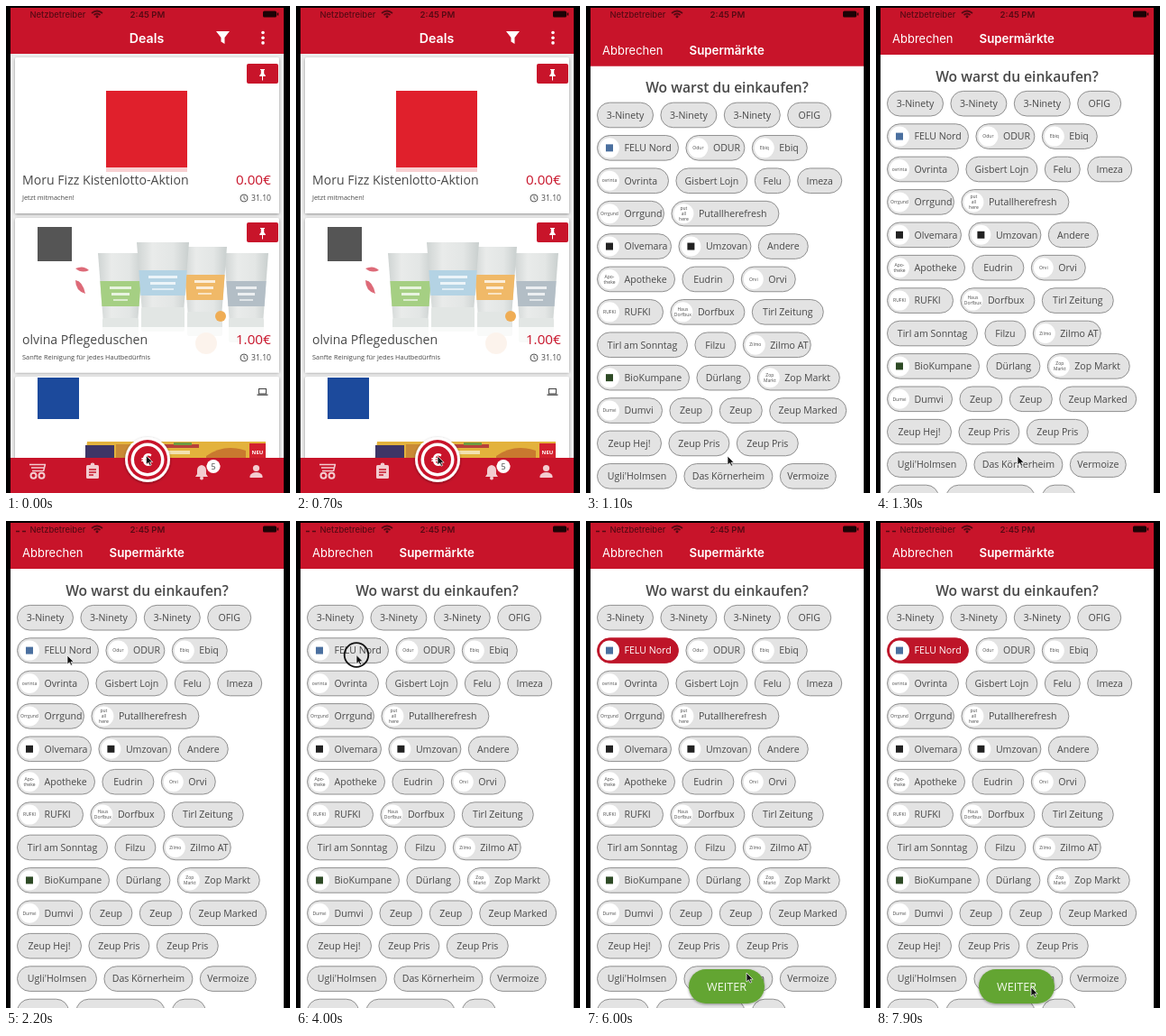
An HTML page that plays this animation: 315x540 px, repeating every 8000 ms.

```html
<!DOCTYPE html>
<html lang="de">
<head>
<meta charset="utf-8">
<title>Deals</title>
<style>
html, body { margin: 0; width: 100%; height: 100%; overflow: hidden; background: #000; }
svg { display: block; width: 100vw; height: 100vh; }
text { font-family: "Open Sans", "Noto Sans", sans-serif; fill: #484848; }
.ui { font-family: Inter, Roboto, sans-serif; fill: #fff; }
.price { font-weight: 500; fill: #c8142a; }
.pill { fill: #e3e3e3; stroke: #858585; stroke-width: .9; }
.on .pill { fill: #be1529; stroke: #be1529; }
.on > .name { fill: #fff; }
</style>
</head>
<body>
<svg viewBox="0 0 315 540">
  <defs>
    <clipPath id="screen"><rect x="5" y="2" width="303" height="538"/></clipPath>
    <filter id="shadow" x="-20%" y="-20%" width="140%" height="150%">
      <feDropShadow dx="0" dy="1" stdDeviation="1.4" flood-opacity=".4"/>
    </filter>
    <filter id="smudge"><feGaussianBlur stdDeviation=".5"/></filter>
    <linearGradient id="plastic">
      <stop stop-color="#cfd4d3"/><stop offset=".3" stop-color="#e9ebea"/>
      <stop offset=".7" stop-color="#e3e6e5"/><stop offset="1" stop-color="#c9cfce"/>
    </linearGradient>
  </defs>
  <rect width="315" height="540"/>
  <g clip-path="url(#screen)">
    <g id="deals"></g>
    <g id="sheet"></g>
    <g id="status" filter="url(#smudge)"></g>
    <g id="next"></g>
  </g>
  <circle id="ring" r="13.3" fill="none" stroke="#111" stroke-width="1.8"/>
  <path id="cursor" d="M0 0V10L2.4 7.8L4 11.2L5.7 10.4L4.1 7.2H7.2Z" fill="#111" stroke="#fff" stroke-width=".7"/>
</svg>
<script>
const LOOP = 8000, STEP = 100;
const RED = '#c8142a', PALE = '#f3ccd0';
const $ = id => document.getElementById(id);

const rect = (x, y, w, h, fill, more = '') =>
  `<rect x="${x}" y="${y}" width="${w}" height="${h}" fill="${fill}" ${more}/>`;
const disc = (x, y, r, fill, more = '') =>
  `<circle cx="${x}" cy="${y}" r="${r}" fill="${fill}" ${more}/>`;
const path = (d, fill, more = '') => `<path d="${d}" fill="${fill}" ${more}/>`;
const label = (x, y, size, str, more = '') =>
  `<text x="${x}" y="${y}" font-size="${size}" ${more}>${str}</text>`;
const MID = 'text-anchor="middle"', END = 'text-anchor="end"';

// Deals page
const card = (y, h, picture, foot = '') =>
  rect(10, y, 293, h, '#fff', 'rx="2" filter="url(#shadow)"') + picture + foot;

const pin = y => rect(267, y, 35, 22, RED, 'rx="2"') +
  path(`M282 ${y + 6}h5v1h-.8v4l1.6 2v1h-2.8v4l-.5 1l-.5-1v-4h-2.8v-1l1.6-2v-4h-.8z`, '#fff');

const foot = (y, name, note, price) =>
  rect(10, y - 19, 293, 51, '#fff', 'opacity=".79"') +
  label(18, y, 14.1, name) +
  label(294, y, 15.2, price, `class="price" ${END}`) +
  label(18, y + 17, 7.4, note) +
  label(294, y + 18, 8.6, '31.10', END) +
  disc(264, y + 15, 4, 'none', 'stroke="#555"') +
  path(`M264 ${y + 12.5}v3l2 1`, 'none', 'stroke="#555" stroke-width=".9"');

const tube = (x, y, w, color) =>
  path(`M${x} ${y}h${w}l-6 78h${12 - w}z`, 'url(#plastic)') +
  path(`M${x + 2.4} ${y + 31}h${w - 4.8}l-2 28h${8.8 - w}z`, color) +
  rect(x + 5, y + 72, w - 10, 27, '#e2e6e4', 'rx="2"') +
  rect(x + 13, y + 37, w - 26, 3, '#fff', 'opacity=".75"') +
  rect(x + 15, y + 44, w - 30, 3, '#fff', 'opacity=".75"') +
  rect(x + 17, y + 51, w - 34, 2, '#fff', 'opacity=".6"');

const shower =
  rect(35, 245, 38, 38, '#555') +
  path('M77 291q9-4 15 2q-8 4-15-2zM77 304q8 1 11 15q-11-3-11-15z', '#dd6a78') +
  tube(102, 274, 50, '#a5cf83') + tube(242, 274, 49, '#b3bec6') +
  tube(196, 267, 49, '#f0b968') + tube(145, 262, 58, '#b4d3e4') +
  disc(238, 344, 6, '#efad55') + disc(222, 374, 12, '#f3c9a8');

const wrap =
  rect(35, 412, 46, 46, '#1c4a9c') +
  path('M90 483h198v30h-202z', '#e3b23c') + rect(88, 487, 32, 20, '#3d3566') +
  rect(122, 486, 28, 20, '#c98a35') + rect(152, 486, 62, 4, '#b7413a') +
  rect(154, 493, 50, 4, '#f2e2b0') + rect(186, 484, 20, 3, '#6f9a3f') +
  path('M222 499q20-14 44-6v9h-44z', '#c9792f') + rect(270, 485, 18, 17, '#d3202e') +
  label(279, 497, 6, 'NEU', `${MID} style="fill:#fff" font-weight="700"`) +
  rect(280.5, 424.5, 8, 5.5, 'none', 'stroke="#444"') + rect(278.5, 430.5, 12, 1.3, '#444');

const tabBar =
  rect(5, 501, 304, 39, RED) +
  path('M26 508.5h18M28 512h15M29 515.5h12M43.5 508l-2 8', 'none', `stroke="${PALE}" stroke-width="1.5"`) +
  disc(30.5, 520.8, 3, 'none', `stroke="${PALE}" stroke-width="2"`) +
  disc(39.5, 520.8, 3, 'none', `stroke="${PALE}" stroke-width="2"`) +
  rect(89, 509, 14, 15, PALE, 'rx="1.5"') + disc(96, 509, 2.4, PALE) +
  path('M92 514h8M92 517h8M92 520h5', 'none', `stroke="${RED}" stroke-width="1.3"`) +
  path('M210 522l2-3v-4q0-5 5-6q5 1 5 6v4l2 3z', PALE) + disc(217, 523.5, 2, PALE) +
  disc(230, 510.5, 7.6, '#fff') + label(230, 514, 9, '5', MID) +
  disc(277.5, 512.5, 3.6, PALE) + path('M270.5 523v-2q2-4 7-4t7 4v2z', PALE) +
  disc(157, 503, 25, '#fff', 'filter="url(#shadow)"') + disc(157, 503, 22, RED) +
  disc(157, 503, 18.5, '#fff') + disc(157, 503, 15, RED) +
  label(156, 510, 19, '€', `class="ui" font-weight="700" ${MID}`);

$('deals').innerHTML =
  rect(5, 2, 304, 538, '#ececec') +
  card(57, 173, rect(111, 94, 90, 90, '#e0202c'),
    foot(198, 'Moru Fizz Kistenlotto-Aktion', 'Jetzt mitmachen!', '0.00€')) + pin(64) +
  card(235, 171, shower,
    foot(375, 'olvina Pflegeduschen', 'Sanfte Reinigung für jedes Hautbedürfnis', '1.00€')) + pin(240) +
  card(411, 140, wrap) +
  rect(5, 2, 304, 51, RED) +
  label(156, 41, 14.2, 'Deals', `class="ui" font-weight="600" ${MID}`) +
  path('M233 28h15l-5.5 7v7l-4-2.5v-4.5z', '#fff') +
  [29.5, 35.2, 40.9].map(y => disc(285, y, 1.8, '#fff')).join('') +
  tabBar;

// Chips: [label, width, avatar text or colour]
const rows = [
  [['3-Ninety', 63], ['3-Ninety', 63], ['3-Ninety', 63], ['OFIG', 49]],
  [['FELU Nord', 91, '#4a6f9f'], ['ODUR', 66, 'Odur'], ['Ebiq', 62, 'Ebiq']],
  [['Ovrinta', 80, 'ovrinta'], ['Gisbert Lojn', 80], ['Felu', 40], ['Imeza', 50]],
  [['Orrgund', 75, 'Orrgund'], ['Putallherefresh', 120, 'put/all/here']],
  [['Olvemara', 83, '#222'], ['Umzovan', 81, '#222'], ['Andere', 56]],
  [['Apotheke', 87, 'Apo-/theke'], ['Eudrin', 58], ['Orvi', 61, 'Orvi']],
  [['RUFKI', 74, 'RUFKI'], ['Dorfbux', 83, 'Haus/Dorfbux'], ['Tirl Zeitung', 80]],
  [['Tirl am Sonntag', 101], ['Filzu', 46], ['Zilmo AT', 76, 'Zilmo']],
  [['BioKumpane', 103, '#2d4a25'], ['Dürlang', 60], ['Zop Markt', 92, 'Zop/Markt']],
  [['Dumvi', 73, 'Dumvi'], ['Zeup', 48], ['Zeup', 48], ['Zeup Marked', 86]],
  [['Zeup Hej!', 72], ['Zeup Pris', 68], ['Zeup Pris', 69]],
  [["Ugli'Holmsen", 89], ['Das Körnerheim', 99], ['Vermoize', 63]],
  [['', 58], ['', 99], ['', 38]]
];

function avatar(x, y, mark) {
  const base = disc(x, y, 11, '#fff');
  if (mark[0] === '#') return base + rect(x - 4, y - 4, 8, 8, mark);
  const lines = mark.split('/');
  return base + lines.map((line, i) =>
    label(x, y + 1.7 + (i - (lines.length - 1) / 2) * 5.8, 5, line, MID)).join('');
}

function chip(x, y, [name, w, mark], id) {
  return `<g id="${id}">` +
    rect(x + .5, y - 13.8, w - 1, 27.6, '', 'class="pill" rx="13.8"') +
    (mark ? avatar(x + 14, y, mark) + label(x + 30.5, y + 3.8, 10.6, name, 'class="name"')
          : label(x + w / 2, y + 3.8, 10.6, name, `class="name" ${MID}`)) + '</g>';
}

const chips = rows.map((row, r) => {
  let x = 12;
  return row.map((item, c) => {
    const out = chip(x, 107.2 + r * 36.4, item, `chip${r}-${c}`);
    x += item[1] + 7.4;
    return out;
  }).join('');
}).join('');

$('sheet').innerHTML =
  rect(5, 52, 304, 490, '#fff') + rect(5, 0, 304, 53, RED) +
  label(18, 40, 13, 'Abbrechen', 'class="ui"') +
  label(114.5, 40, 13.3, 'Supermärkte', 'class="ui" font-weight="600"') +
  label(156.5, 82.5, 15.6, 'Wo warst du einkaufen?', `font-weight="600" ${MID}`) +
  chips;

const INK = '#560913';
$('status').innerHTML =
  `<path id="signal" d="M11 11.5h4M18 11.5h4" stroke="${INK}" stroke-width="1.3"/>` +
  label(26.5, 12.5, 9.4, 'Netzbetreiber', `class="ui" font-weight="500" style="fill:${INK}"`) +
  path('M95 8q6-5 12 0M97.5 10q3.5-3 7 0', 'none', `stroke="${INK}" stroke-width="1.7"`) +
  disc(101, 11.8, 1.5, INK) +
  label(157, 12.5, 9.6, '2:45 PM', `class="ui" font-weight="600" style="fill:${INK}" ${MID}`) +
  rect(285, 5.5, 15, 7, '#1c0306', 'rx="1.5"') + rect(300.7, 7.5, 1.5, 3, '#1c0306');

$('next').innerHTML =
  rect(114, 497, 84, 38, '#63a532', 'rx="19" filter="url(#shadow)"') +
  label(156, 520.8, 12.6, 'WEITER', `${MID} style="fill:#f4faee"`);

// Motion
const clamp = v => Math.min(1, Math.max(0, v));
const ease = v => v * v * (3 - 2 * v);
const between = (t, a, b) => ease(clamp((t - a) / (b - a)));

// Critically damped spring from below the stage
function sheetOffset(t) {
  const x = Math.max(0, t - 730) * .015;
  return 540 * (1 + x) * Math.exp(-x);
}

// [start, end, x, y]
const moves = [
  [0, 300, 157, 499], [1500, 2100, 68, 149], [3000, 3400, 67, 148.5],
  [4600, 5500, 178, 501], [6400, 6800, 172, 517]
];

function cursorAt(t) {
  let x = 155.5, y = 498.5;
  for (const [a, b, toX, toY] of moves) {
    const p = between(t, a, b);
    x += (toX - x) * p;
    y += (toY - y) * p;
  }
  return [x, y];
}

const show = (id, on) => $(id).setAttribute('visibility', on ? 'visible' : 'hidden');

function draw(t) {
  $('sheet').setAttribute('transform', `translate(0 ${sheetOffset(t).toFixed(2)})`);
  const at = `translate(${cursorAt(t).join(' ')})`;
  $('cursor').setAttribute('transform', at);
  $('ring').setAttribute('transform', at);
  show('ring', t >= 3900 && t < 4200);
  show('signal', t >= 1500);
  $('chip1-0').classList.toggle('on', t >= 4200);
  const p = between(t, 4100, 4500);
  $('next').setAttribute('opacity', p);
  $('next').setAttribute('transform', `translate(0 ${(1 - p) * 43})`);
}

const start = performance.now();
function tick() {
  const t = (performance.now() - start) % LOOP;
  draw(Math.floor(t / STEP) * STEP);
  requestAnimationFrame(tick);
}
tick();
</script>
</body>
</html>
```
